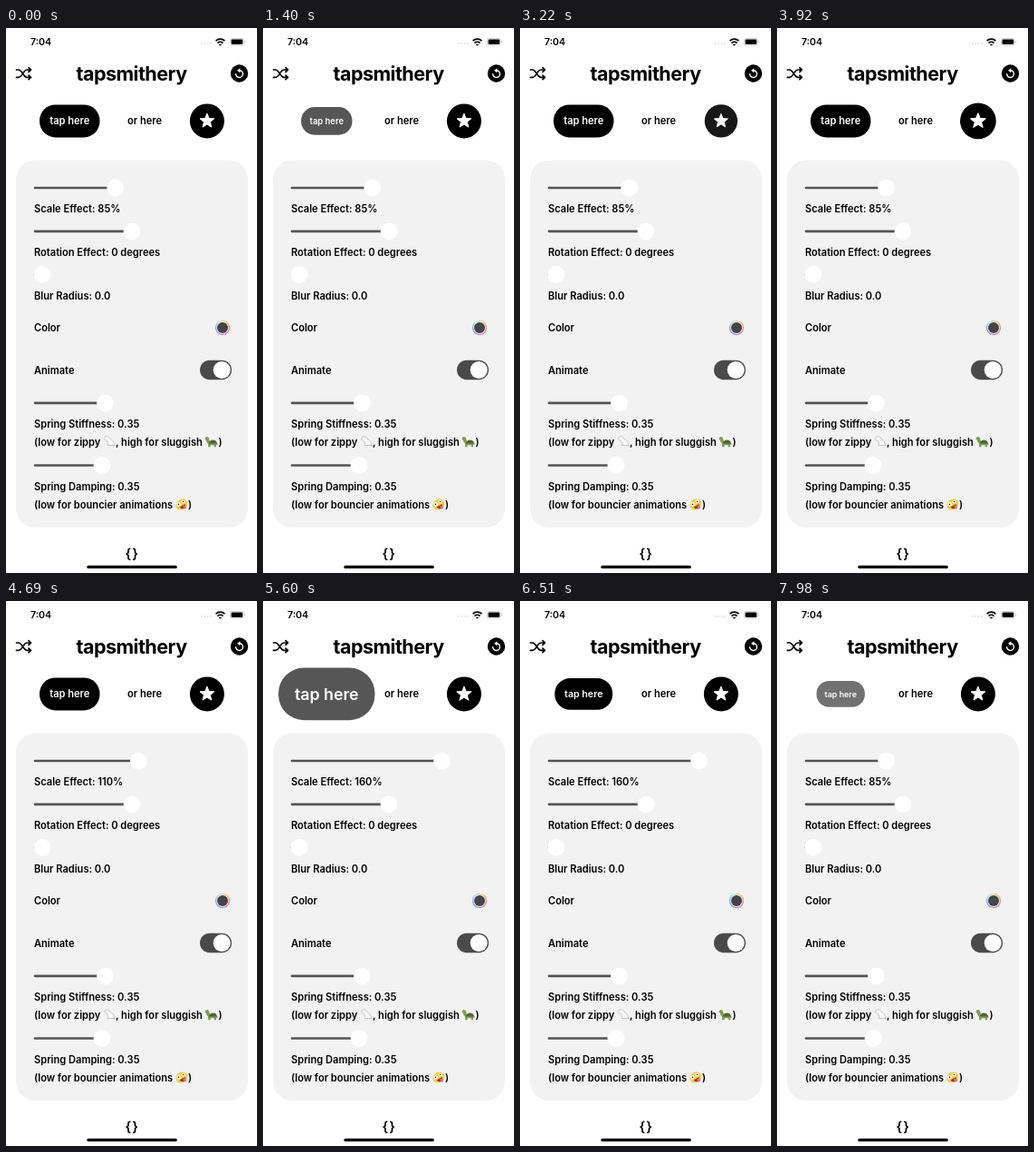
Animation, 277 px wide and 600 px high, one loop 8000 ms. Source, as an HTML page:

```html
<!DOCTYPE html>
<html lang="en">
<head>
<meta charset="utf-8">
<title>Button playground</title>
<style>
  html, body { margin: 0; width: 100%; height: 100%; overflow: hidden; background: #fff; }
  svg { display: block; width: 277px; height: 600px; font: 570 11.1px Inter, sans-serif; }
  .line { fill: none; stroke: #000; stroke-width: 1.7; stroke-linecap: round; stroke-linejoin: round; }
  .middle { text-anchor: middle; }
  .wheel {
    position: absolute; left: 230.5px; top: 321.5px; width: 16px; height: 16px; border-radius: 50%;
    background: conic-gradient(#d5dc9a, #f5935c 20%, #f0609a 35%, #b06cf0 50%, #6a8cf5 70%, #9cdcee 88%, #d5dc9a);
  }
</style>
</head>
<body>
<svg viewBox="0 0 277 600">
  <!-- status bar -->
  <text x="27" y="19" font-size="10.6" font-weight="600">7:04</text>
  <path d="M215 17h12" stroke="#ddd" stroke-width="1.6" stroke-dasharray="1.6 1.8"/>
  <g fill="none" stroke="#000" stroke-width="1.7">
    <path d="M231.6 14.2a7 7 0 0 1 9.8 0M233.5 16.6a4.4 4.4 0 0 1 6 0"/>
    <path d="M235.4 18.2h2.2l-1.1 1.1z" stroke-width="1"/>
    <rect x="247.4" y="11.4" width="15" height="7.8" rx="2.2" stroke="#bbb" stroke-width=".7"/>
  </g>
  <rect x="248.6" y="12.6" width="12.6" height="5.4" rx="1.2"/>
  <path d="M263.6 13.8q1.4 1.4 0 2.8z" fill="#aaa"/>

  <!-- header -->
  <path class="line" d="M11.5 46h2.3c4 0 5.5 8.4 9.5 8.4h3.5M11.5 54.4h2.3c1.7 0 2.9-1.4 3.9-3M19.5 48.7c1-1.6 2.2-2.7 3.8-2.7h3.5M25 43.7l2.5 2.3l-2.5 2.3M25 52.1l2.5 2.3l-2.5 2.3"/>
  <text class="middle" x="138.5" y="58" font-size="21.5" font-weight="700" letter-spacing="-.5">tapsmithery</text>
  <circle cx="257.5" cy="50" r="9.7"/>
  <path d="M257.5 46.7a3.9 3.9 0 1 1-3.9 3.9" fill="none" stroke="#fff" stroke-width="1.4" stroke-linecap="round"/>
  <path d="M255 46.7l3.4-2.5v5z" fill="#fff"/>

  <!-- buttons, each drawn around its own centre -->
  <g id="pill">
    <rect x="-33.2" y="-18" width="66.4" height="36" rx="17.5"/>
    <text class="middle" y="4" font-size="11.1" font-weight="600" fill="#fff">tap here</text>
  </g>
  <g id="plain"><text class="middle" y="4">or here</text></g>
  <g id="round">
    <circle r="19"/>
    <path id="star" fill="#fff" stroke="#fff" stroke-linejoin="round"/>
  </g>

  <!-- settings -->
  <g transform="translate(0 .5)">
    <rect x="11" y="145" width="256" height="404.5" rx="21" fill="#f2f2f2"/>
    <g id="sliders"></g>
    <text id="scaleLabel" x="31" y="202"></text>
    <text x="31" y="250">Rotation Effect: 0 degrees</text>
    <text x="31" y="298">Blur Radius: 0.0</text>
    <text x="31" y="333">Color</text>
    <text x="31" y="380">Animate</text>
    <rect x="214" y="365.2" width="35" height="21.5" rx="10.75" fill="#4a4a4a"/>
    <circle cx="238.2" cy="376" r="9.5" fill="#fff"/>
    <text x="31" y="439">Spring Stiffness: 0.35</text>
    <text x="31" y="459.5">(low for zippy</text>
    <text x="121" y="459.5">, high for sluggish</text>
    <text x="234.5" y="459.5">)</text>
    <text x="31" y="508">Spring Damping: 0.35</text>
    <text x="31" y="528">(low for bouncier animations</text>
    <text x="201" y="528">)</text>

    <!-- mouse, turtle, silly face -->
    <path d="M108.5 452q0-3 3-3t3.5 3q4 1 4.500 7h-7.500q1.500-2-.500-5q-2 0-3-2zM119 459.500h2.500" fill="#fafafa" stroke="#aaa" stroke-width=".6"/>
    <g fill="#7f9d57">
      <path d="M219.500 451.500q1-3 4-1.500l2 6h7l1.500 2l-2 .5v2.300h-2.300v-2h-4v2h-2.500l-.3-4q-2-1-2-3.500q-1.400 0-1.400-1.800z"/>
      <path d="M223.800 457q1-4 4.700-4t4.500 4z" fill="#55623c"/>
    </g>
    <g transform="translate(193.800 524) rotate(-30)">
      <ellipse rx="6.800" ry="5.800" fill="#f8cb52"/>
      <path d="M-3.500 1.500h7q-.5 3.500-3.500 3.500t-3.500-3.500z" fill="#7a4326"/>
      <path d="M0 2.500h3v3q-1.500 1.500-3 0z" fill="#ec6878"/>
      <g fill="#fff"><circle cx="-2.800" cy="-1.800" r="2.300"/><circle cx="3" cy="-1.800" r="1.800"/></g>
      <circle cx="-2.800" cy="-1.800" r=".7"/><circle cx="3" cy="-1.800" r=".6"/>
    </g>
  </g>

  <!-- footer -->
  <text class="middle" x="139.3" y="584.3" font-size="14.7" font-weight="600" letter-spacing="1">{}</text>
  <rect x="89.300" y="591.700" width="99.500" height="3.400" rx="1.700"/>
</svg>
<div class="wheel"><svg viewBox="0 0 16 16" style="width: 16px; height: 16px">
  <circle cx="8" cy="8" r="6.900" fill="#f2f2f2"/><circle cx="8" cy="8" r="6" fill="#454545"/>
</svg></div>

<script>
const LOOP = 8000, TICK = 70;
const RESPONSE = 0.35, DAMPING = 0.35, DIM = 0.34;
const $ = id => document.getElementById(id);

// Press and release times in ms
const buttons = [
  { el: $('pill'), x: 70.25, taps: [[740, 1410], [5485, 6230], [7793, LOOP]] },
  { el: $('plain'), x: 153, taps: [[2330, 2750]] },
  { el: $('round'), x: 221.9, taps: [[3172, 3750]] },
];

const starPoints = Array.from({ length: 10 }, (_, i) => {
  const a = i * Math.PI / 5, r = i % 2 ? 3.6 : 8.3;
  return [r * Math.sin(a), -r * Math.cos(a)].map(v => v.toFixed(2));
});
$('star').setAttribute('d', `M${starPoints.join('L')}Z`);

$('sliders').innerHTML = [[120.7, 175.5], [139, 223.3], [40, 270.8], [109.5, 412.3], [106, 481]]
  .map(([x, y]) => `<path d="M32 ${y}H${x}" stroke="#555" stroke-width="2.7" stroke-linecap="round"/>
    <circle cx="${x}" cy="${y}" r="9.4" fill="#fff"/>`).join('');
const [track, thumb] = $('sliders').children;

// Step response of an underdamped spring
function spring(ms) {
  if (ms <= 0) return 0;
  const t = ms / 1000, w = 2 * Math.PI / RESPONSE, root = Math.sqrt(1 - DAMPING ** 2);
  const phase = w * root * t;
  return 1 - Math.exp(-DAMPING * w * t) * (Math.cos(phase) + DAMPING / root * Math.sin(phase));
}

function smooth(t, from, to) {
  const u = Math.min(1, Math.max(0, (t - from) / (to - from)));
  return u * u * (3 - 2 * u);
}

function draw(t) {
  const drag = smooth(t, 4560, 4900) - smooth(t, 6650, 7150);
  const percent = 5 * Math.round((85 + 75 * drag) / 5);
  const x = 120.7 + (percent - 85) * 1.024;
  track.setAttribute('d', `M32 175.5H${x}`);
  thumb.setAttribute('cx', x);
  $('scaleLabel').textContent = `Scale Effect: ${percent}%`;

  for (const { el, x, taps } of buttons) {
    const press = taps.reduce((sum, [down, up]) => sum + spring(t - down) - spring(t - up), 0);
    const scale = 1 + (percent / 100 - 1) * press;
    el.setAttribute('transform', `translate(${x} 102.4) scale(${scale})`);
    el.setAttribute('opacity', Math.min(1, 1 - DIM * press));
  }
}

const start = performance.now();
function frame() {
  const t = (performance.now() - start) % LOOP;
  draw(Math.floor(t / TICK) * TICK);
  requestAnimationFrame(frame);
}
frame();
</script>
</body>
</html>
```
